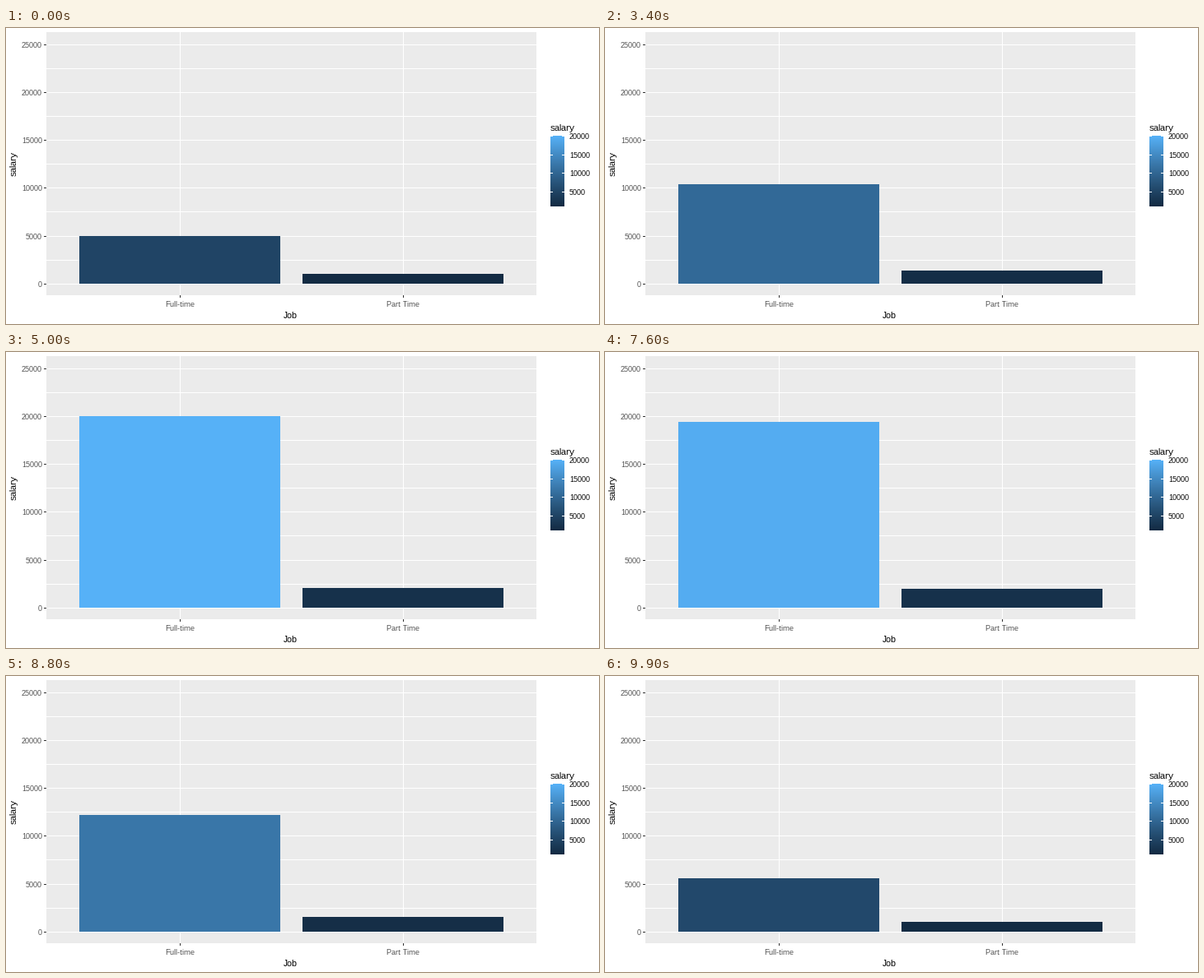
Recreate the animation shown at these times as a matplotlib script. Size 720x360 px, loop 10 s.

```python
import numpy as np
import matplotlib.pyplot as plt
from matplotlib.animation import FuncAnimation
from matplotlib.patches import Rectangle

W, H, DPI = 720, 360, 72
FRAMES, INTERVAL = 100, 100
HOLD, STEPS = 25, 25

LEFT, RIGHT, TOP, BOTTOM = 49, 644, 5, 325
ZERO_Y, PX_PER_UNIT = 310.7, 58.15 / 5000
CENTERS = (211, 482)
BARS = ((89, 333), (360, 604))
LOW, HIGH = np.array([[5000, 1000], [20000, 2000]])
DOMAIN = (1000, 20000)

plt.rcParams.update({
    "font.family": "Liberation Sans",
    "text.hinting": "default",
    "text.hinting_factor": 1,
})

# sRGB <-> Lab, used for the colour scale
TO_XYZ = np.array([[0.4124564, 0.3575761, 0.1804375],
                   [0.2126729, 0.7151522, 0.0721750],
                   [0.0193339, 0.1191920, 0.9503041]])
WHITE = TO_XYZ.sum(axis=1)


def rgb_to_lab(rgb):
    rgb = np.asarray(rgb) / 255
    lin = np.where(rgb > 0.04045, ((rgb + 0.055) / 1.055) ** 2.4, rgb / 12.92)
    t = TO_XYZ @ lin / WHITE
    fx, fy, fz = np.where(t > 0.008856, np.cbrt(t), 7.787 * t + 16 / 116)
    return np.array([116 * fy - 16, 500 * (fx - fy), 200 * (fy - fz)])


def lab_to_rgb(lab):
    fy = (lab[0] + 16) / 116
    f = np.array([fy + lab[1] / 500, fy, fy - lab[2] / 200])
    xyz = np.where(f > 0.206893, f ** 3, (f - 16 / 116) / 7.787) * WHITE
    lin = np.clip(np.linalg.solve(TO_XYZ, xyz), 0, 1)
    rgb = np.where(lin > 0.0031308, 1.055 * lin ** (1 / 2.4) - 0.055, 12.92 * lin)
    return np.clip(rgb, 0, 1)


DARK = rgb_to_lab((0x13, 0x2B, 0x43))
LIGHT = rgb_to_lab((0x56, 0xB1, 0xF7))


def shade(value):
    t = (value - DOMAIN[0]) / (DOMAIN[1] - DOMAIN[0])
    return lab_to_rgb(DARK + (LIGHT - DARK) * t)


def y_of(value):
    return round(ZERO_Y - value * PX_PER_UNIT)


fig = plt.figure(figsize=(W / DPI, H / DPI), dpi=DPI, facecolor="white")
ax = fig.add_axes([0, 0, 1, 1])
ax.set_xlim(0, W)
ax.set_ylim(H, 0)
ax.axis("off")


def box(x0, y0, x1, y1, color, z=1):
    patch = Rectangle((x0, y0), x1 - x0, y1 - y0, facecolor=color,
                      linewidth=0, antialiased=False, zorder=z)
    return ax.add_patch(patch)


def label(x, y, text, size=9, color="black", ha="left", **kw):
    kw.setdefault("va", "baseline")
    ax.text(x, y, text, fontsize=size, color=color, ha=ha, zorder=6, **kw)


def draw_panel():
    box(LEFT, TOP, RIGHT, BOTTOM, "#EBEBEB")
    for value in range(0, 25001, 2500):
        y = y_of(value)
        box(LEFT, y, RIGHT, y + 1, "white", 2)
        if value % 5000 == 0:
            box(LEFT - 3, y, LEFT, y + 1, "#333333")
            label(44, y + 4, str(value), color="#4D4D4D", ha="right")
    for x, name in zip(CENTERS, ("Full-time", "Part Time")):
        box(x, TOP, x + 1, BOTTOM, "white", 2)
        box(x, BOTTOM, x + 1, BOTTOM + 3, "#333333")
        label(x, 339, name, color="#4D4D4D", ha="center")
    label(345.5, 353, "Job", size=11, ha="center")
    label(15, 165.5, "salary", size=11, ha="right", va="center", rotation=90)


def draw_legend():
    x0, x1, y0, y1 = 661, 678, 131, 217
    label(x0, 125, "salary", size=11)
    ramp = [[shade(v)] for v in np.linspace(DOMAIN[1], DOMAIN[0], y1 - y0)]
    ax.imshow(ramp, extent=(x0, x1, y1, y0), aspect="auto",
              interpolation="nearest", zorder=3)
    for value in range(5000, 20001, 5000):
        t = (DOMAIN[1] - value) / (DOMAIN[1] - DOMAIN[0])
        y = round(y0 + t * (y1 - y0))
        box(x0, y, x0 + 3, y + 1, "white", 4)
        box(x1 - 3, y, x1, y + 1, "white", 4)
        label(684, y + 4, str(value))


draw_panel()
draw_legend()
ax.set_xlim(0, W)
ax.set_ylim(H, 0)
bars = [box(a, 300, b, y_of(0), "black", 5) for a, b in BARS]


def update(i):
    rise = np.clip(i - HOLD, 0, STEPS)
    fall = np.clip(i - 2 * HOLD - STEPS, 0, STEPS)
    values = LOW + (HIGH - LOW) * (rise - fall) / STEPS
    for bar, value in zip(bars, values):
        top = y_of(value)
        bar.set_y(top)
        bar.set_height(y_of(0) - top)
        bar.set_facecolor(shade(value))
    return bars


anim = FuncAnimation(fig, update, frames=FRAMES, interval=INTERVAL,
                     repeat=True, repeat_delay=0, blit=False)
plt.show()
```
